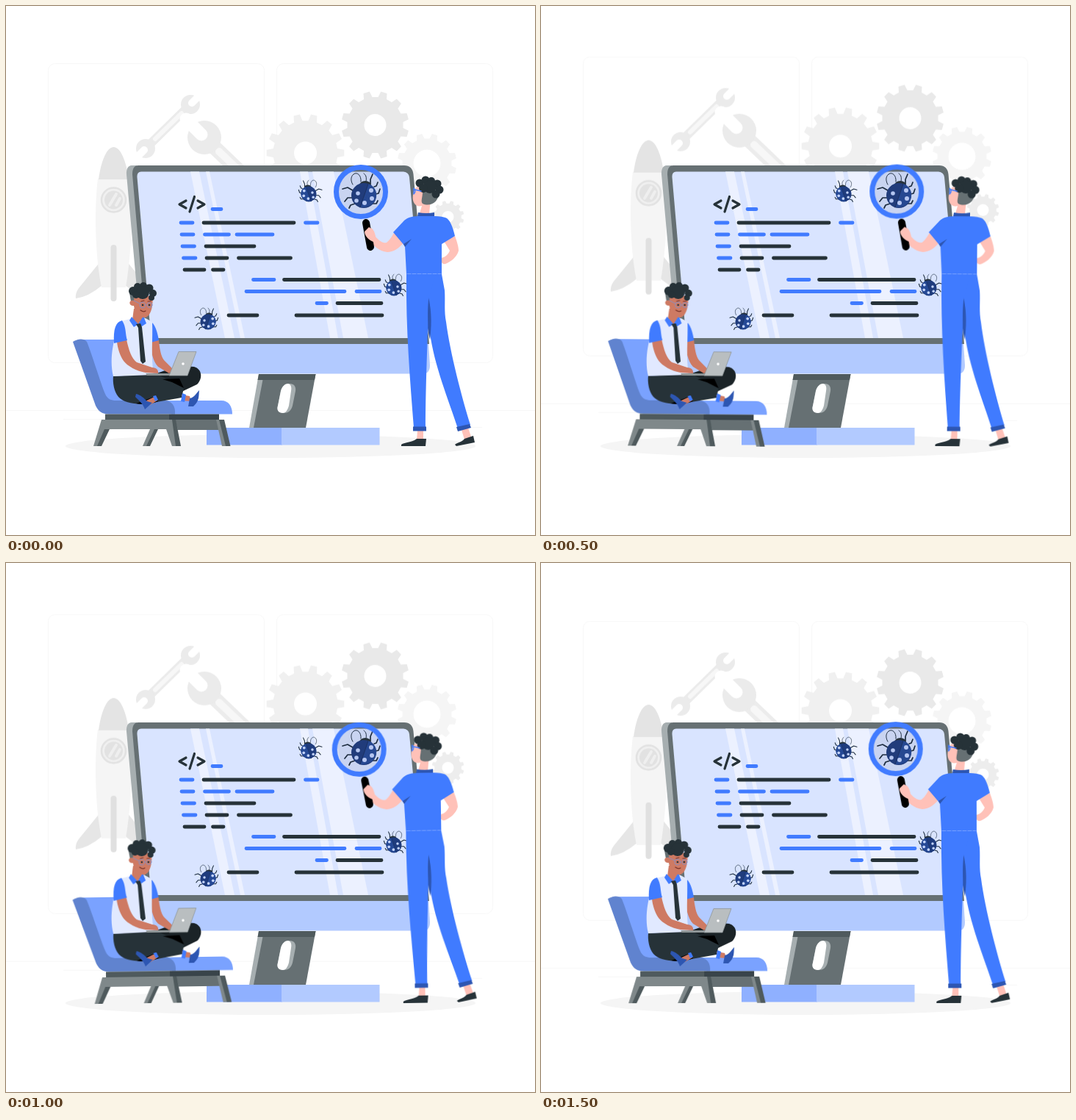
These frames come from a looping animation (720x720 px, 1540 ms). An HTML page:

```html
<!DOCTYPE html>
<html lang="en">
<head>
<meta charset="utf-8">
<title>Debugging</title>
<style>
html, body { margin: 0; width: 100%; height: 100%; overflow: hidden; background: #fff; }
svg { display: block; width: 100%; height: 100%; }
.float { animation: float 1540ms linear -47ms infinite; }
.sway { animation: sway 1540ms linear -47ms infinite; }
#coder { transform-origin: 199.5px 488px; }
#tester { transform-origin: 542px 408px; }
@keyframes float {
  0%, 100% { transform: translateY(.9px); }
  50% { transform: translateY(-13.5px); }
}
@keyframes sway {
  0%, 100% { transform: rotate(-.12deg); }
  25% { transform: rotate(.88deg); }
  75% { transform: rotate(-1.12deg); }
}
.line { fill: none; stroke-linecap: round; stroke-linejoin: round; }
.blue { fill: #407bff; }
.deep { fill: #2d56b2; }
.dark { fill: #263238; }
.steel { fill: #667073; }
.silver { fill: #a6aeb0; }
.pink { fill: #ffc1b8; }
.brown { fill: #ce7a63; }
</style>
</head>
<body>
<svg viewBox="0 0 720 720">
  <defs>
    <g id="bug">
      <g class="line" stroke="#1b2b3c" stroke-width="1.700">
        <path d="M-15-4l-7-4-7 2M-16 6l-6 0-4 5M-12 14l-6 2-2 4M12 14l5 0 2-4M16 1l4-1 2-6M9-13l0-6 3-7M14-9l3-1 2-5"/>
        <path stroke-width="1" d="M-4-16c1-8-5-14-10-10s-3 11-1 14M3-16c1-6 0-9-3-11"/>
      </g>
      <ellipse class="dark" cx="2" cy="-11" rx="8" ry="6"/>
      <ellipse cy="3" rx="17" ry="17" fill="#1f3c7d"/>
      <path d="M6-13C15-10 18-2 17 5 14 15 6 20-5 19Z" fill="#254995"/>
      <path class="line" d="M6-13-5 19" stroke="#182f62"/>
      <g fill="#c3d4ff">
        <circle cx="-8" cy="0" r="2.800"/><circle cx="-10" cy="10" r="2.800"/><circle cx="1" cy="13" r="3"/>
        <circle cx="11" cy="7" r="3"/><circle cx="10" cy="-4" r="3"/>
      </g>
    </g>
  </defs>

  <g class="float">
    <g fill="none" stroke="#f7f7f7">
      <rect x="57.5" y="78.5" width="294" height="407" rx="9"/>
      <rect x="368.5" y="78.5" width="294" height="407" rx="9"/>
      <path d="M0 550.5H720M78 562.5H136M632 573.5H648"/>
    </g>
    <g id="rocket">
      <path fill="#e6e6e6" d="M129 347 99 384Q94 391 95 398 112 396 131 380ZM164 347 194 384Q199 391 198 398 181 396 162 380Z"/>
      <path fill="#f5f5f5" d="M125 235H168C173 280 171 335 163 383H130C121 340 120 275 125 235Z"/>
      <path fill="#e4e4e4" d="M126 236C129 212 137 192 146.500 192S164 212 167 236Z"/>
      <circle cx="146.500" cy="264" r="16.500" fill="#f0f0f0" stroke="#e2e2e2" stroke-width="2.500"/>
      <circle cx="146.500" cy="264" r="12.500" fill="#e2e2e2"/>
      <path class="line" stroke="#efefef" stroke-width="4" d="M141 271 150 256M150 271 155 262"/>
      <rect x="142.500" y="325" width="8" height="77" rx="4" fill="#e0e0e0"/>
    </g>
    <g class="line">
      <path stroke="#ebebeb" stroke-width="12" d="M194 190 247 138"/>
      <path stroke="#f7f7f7" stroke-width="6" d="M203 181 239 146"/>
      <path stroke="#ececec" stroke-width="20" d="M277 186 325 232"/>
      <path stroke="#f7f7f7" stroke-width="10" d="M290 198 330 236"/>
    </g>
    <g fill="#ebebeb">
      <circle cx="251" cy="134" r="13"/><circle cx="190" cy="194" r="13"/><circle cx="270" cy="179" r="23"/>
    </g>
    <g class="line" stroke="#fff">
      <path stroke-width="10" d="M253 132 266 119M188 196 175 209"/>
      <path stroke-width="17" d="M266 175 245 154"/>
    </g>
    <g id="gears"></g>
  </g>

  <ellipse cx="360" cy="599" rx="279" ry="16" fill="#f5f5f5"/>

  <g id="monitor">
    <path fill="#8fb0ff" d="M273 574H376V597.500H273Z"/>
    <path fill="#b2caff" d="M375 574H508.500V597.500H375Z"/>
    <path class="silver" d="M344 501H352L338 574H331Z"/>
    <path class="steel" d="M351 501H421.500L408 574H337Z"/>
    <path fill="#4f5a5d" d="M344 501H421.500L420 509H342.500Z"/>
    <path class="silver" d="M374 524C376 517 381 514 386 514 392 514 395 518 394 524L390 544C388 551 384 554 378 554 371 554 368 550 370 544Z"/>
    <path fill="#fff" d="M374 524C376 517 380 514 384 514 388 515 389 519 388 524L385 544C383 551 380 554 377 554 371 554 368 550 370 544Z"/>
    <path class="silver" d="M178 217H171C166 217 163.500 222 164 229L185 462H200Z"/>
    <path fill="#8fb0ff" d="M185 459H200L204 500H196Q189 500 188 493Z"/>
    <path fill="#b2caff" d="M192 459H575L577 489Q577 500.500 567 500.500H203Q196 500 195 493Z"/>
    <path class="steel" d="M180 217H542Q553 217 554.500 229L576 460H192L172 229Q172 217 180 217Z"/>
    <path fill="#d9e4ff" d="M184 225.500H541Q548 226 549 233L569 452H197.500L178.500 233Q178 226 184 225.500Z"/>
    <path fill="#ecf1ff" d="M251 225.500H263L311 452H298ZM272 225.500H277L325 452H319ZM400 225.500H411L452 452H441ZM417 225.500H446L493 452H459Z"/>
    <g class="line" stroke-width="3.200" stroke="#263238">
      <path d="M245 265 236 270 245 275M256.500 259.500 250 280M261 265 270 270 261 275"/>
    </g>
    <g class="line" stroke-width="4.800">
      <path stroke="#407bff" d="M281 276.500h12M238 295h16M407.500 295H424M239 311h16M270.500 311h33M314 311h49M240 327h16.500M241.500 343H258M336.500 372.500H365M327 388.500H461M477 388.500h32M423 404.500h13.500"/>
      <path stroke="#263238" d="M269 295H392M272 327h66M273 343h28M316.500 343h71M243 359h27M281.500 359H296M378.500 372.500H508M451 404.500h60M303 421h39M395 421H512"/>
    </g>
    <use href="#bug" transform="translate(412 254) scale(-.62 .62)"/>
    <use href="#bug" transform="translate(275 428) scale(.62)"/>
    <use href="#bug" transform="translate(528 382) scale(-.62 .62)"/>
    <use href="#bug" transform="translate(487 255)"/>
  </g>

  <g id="coder" class="sway">
    <path fill="#7aa2ff" d="M97 454H152L180 540H130L108 470ZM213 537H293C303 537 308 545 308 555.500H225Z"/>
    <path fill="#6083cf" d="M91 457C98 453 105 452 110 457 115 468 129 514 135 528 138 535 143 537 150 537H215C226 537 231 545 230 555.500H140C131 555.500 126 552 122 544Z"/>
    <path fill="#4f5a5d" d="M135 555.500H222V563H135Z"/>
    <path fill="#39444a" d="M222 555.500H290V563H222Z"/>
    <path class="steel" d="M229 563H292V577H232Z"/>
    <path fill="#7f888a" d="M130 563H230L234 576H136L125 599H119ZM196 576H204L192 599H186ZM218 576H230L232 599H226ZM286 563H291L300 599H294Z"/>
    <path fill="#4f5a5d" d="M134 576H141L130 599H124ZM202 576H207L196 599H191ZM226 563H231L238 599H231ZM290 563H297L305.500 599H299Z"/>

    <path fill="#1b2327" d="M200 502C225 492 244 489 256 491 267 494 268 507 260 515L239 525 215 520Z"/>
    <path class="dark" d="M146 504 205 500C218 509 236 514 242 520L239 533 205 539C185 544 162 542 153 532 147 525 145 512 146 504Z"/>
    <path d="M213 508 236 507 242 520 226 512ZM177 541 201 532 207 538C198 542 187 543 177 541Z"/>
    <path class="brown" d="M189 538 204 531 206 537 196 543ZM239 529 250 531 252 538 240 537Z"/>
    <path class="blue" d="M240 527 245 529 243 539 238 538ZM200 531 204 530 207 536 203 538Z"/>
    <path class="deep" d="M177 528C183 529 188 534 192 538L199 540 189 549C187 542 181 537 176 532ZM263 523C262 530 264 537 255 545L248 545 250 534C256 533 259 527 263 523Z"/>

    <path class="brown" d="M197 456 208 455C209 466 211 477 215 482L229 496 222 500 207 491C200 484 197 470 197 456Z"/>
    <path class="blue" d="M196 429C203 432 206 444 208 455L197 458Z"/>
    <path fill="#e1e9ff" d="M156 429 173 425 190 425 199 430C200 455 197 475 201 502L146 504C140 478 147 450 156 429Z"/>
    <path class="brown" d="M151 457 164 454C167 468 171 480 178 485L199 492C205 492 208 496 207 500L190 499C178 497 165 490 160 483 155 476 152 466 151 457Z"/>
    <path class="blue" d="M158 428C149 430 146 440 147 459L165 455C162 446 164 437 158 428Z"/>
    <path class="brown" d="M174 412H188L187 429 180 435 172 427Z"/>
    <path class="blue" d="M171 423 180 433 174 437 168 428ZM187 422 191 432 185 436 180 433Z"/>
    <path class="dark" d="M177 433 183 432 185 437 190 484 186 487 183 483 180 438Z"/>

    <path class="steel" d="M168 390H178L176 405 170 402Z"/>
    <path class="brown" d="M175 393C183 396 192 396 199 393 201 406 198 421 190 424 181 424 175 417 174 408 167 409 166 399 174 401Z"/>
    <g class="dark">
      <circle cx="173" cy="388" r="6"/><circle cx="179" cy="382" r="5"/><circle cx="187" cy="381" r="5"/>
      <circle cx="195" cy="384" r="5.500"/><circle cx="200" cy="391" r="5"/><circle cx="186" cy="390" r="9"/>
      <circle cx="177" cy="393" r="5"/><circle cx="198" cy="397" r="4"/>
      <circle cx="186" cy="407" r="1.300"/><circle cx="195" cy="407" r="1.300"/>
    </g>
    <g class="line" stroke="#8a8fc0" stroke-width="1">
      <path d="M174 401 182 405"/><circle cx="186" cy="407" r="4"/><circle cx="195.500" cy="407" r="3.500"/>
    </g>
    <path class="line" stroke="#7a3328" stroke-width="1.200" d="M183 414Q187 417 190 415M184 402 188 401M193 402 197 402"/>

    <path fill="#8f9698" d="M190 500H224L246 500V503H192Z"/>
    <path fill="#b9bec0" stroke="#8f9698" stroke-width=".8" d="M235 470.500H259L247 503H222Z"/>
    <circle cx="241" cy="487" r="1.800" fill="#fff"/>
  </g>

  <g id="tester" class="sway">
    <circle cx="483" cy="253" r="33.500" fill="#2d3f66" fill-opacity=".09" stroke="#407bff" stroke-width="7"/>
    <path class="pink" d="M490 307 496 302C500 303 502 308 503 314 509 321 514 323 518 322 523 318 526 312 529 307L542 321C535 330 527 335 519 335 508 334 498 325 494 318Z"/>
    <path class="line" stroke="#000" stroke-width="10" d="M490 295 496 328"/>
    <path class="pink" d="M488 307 494 301C499 303 501 308 503 314L500 321C494 319 488 313 488 307Z"/>
    <path class="pink" d="M611 313C614 321 616 328 616 333 614 342 604 349 598 351 594 352 591 348 592 343 598 342 602 338 604 333L596 320Z"/>
    <path class="pink" d="M560 578H568V591H559ZM620 577 629 574 633 586 624 590Z"/>
    <path class="dark" d="M559 589H572L571 599H538V597C541 594 553 594 559 589ZM624 589 636 585 638 594 613 599 611 597C614 594 620 594 624 589Z"/>
    <path class="blue" d="M560 365H593L597 387C598 402 596 416 599 430 604 470 621 535 632 570L615 575C602 535 583 490 577 445L570 395Z"/>
    <path class="deep" d="M575 396C571 415 573 440 577 454 579 438 580 418 575 396Z"/>
    <path class="blue" d="M545 364H585L575 400C573 420 575 432 574 445 572 500 571 540 571 574H555C550 510 544 440 545 364Z"/>
    <path class="deep" d="M554 572.500H572V578.500H554ZM613 573 631 569 633 574 615 579Z"/>
    <path class="blue" d="M562 286C550 286 545 289 541 293L527 308 543 327 545 365H593V324L611 313C608 300 604 290 598 288 591 286 585 286 581 286Z"/>
    <path class="deep" d="M552 317 541 324 543 328Z"/>
    <path class="line" stroke="#77a0ff" d="M546 364.500H592" stroke-dasharray="5 2"/>
    <path class="pink" d="M559 246C553 253 552 264 556 269 558 272 562 273 566 272L563 282 576 283 578 262 568 248Z"/>
    <path class="deep" d="M561 281Q572 283 583 281V286H560Z"/>
    <path class="steel" d="M567 253C567 261 564 266 567 269 578 274 590 266 589 253Z"/>
    <g class="dark">
      <circle cx="563" cy="241" r="5.500"/><circle cx="571" cy="237" r="5.500"/><circle cx="579" cy="238" r="5"/>
      <circle cx="587" cy="242" r="5.500"/><circle cx="590" cy="250" r="5.500"/><circle cx="577" cy="246" r="9"/>
      <circle cx="585" cy="256" r="5.500"/><circle cx="568" cy="248" r="6"/>
    </g>
    <path class="line" stroke="#407bff" stroke-width="1.300" d="M565 252 557 250M555 248Q559 252 555 256Z"/>
  </g>
</svg>
<script>
const gears = document.getElementById('gears');

function gear(x, y, r, hole, teeth, fill) {
  const step = 2 * Math.PI / teeth, root = r * .83;
  const at = (a, d) => `${(x + d * Math.sin(a)).toFixed(1)} ${(y - d * Math.cos(a)).toFixed(1)}`;
  const points = [];
  for (let i = 0; i < teeth; i++) {
    const a = (i + .5) * step;
    points.push(at(a - .3 * step, root), at(a - .18 * step, r), at(a + .18 * step, r), at(a + .3 * step, root));
  }
  const ring = `M${x - hole} ${y}a${hole} ${hole} 0 1 0 ${2 * hole} 0a${hole} ${hole} 0 1 0 ${-2 * hole} 0Z`;
  return `<path fill="${fill}" fill-rule="evenodd" d="M${points.join('L')}Z${ring}"/>`;
}

gears.innerHTML =
  gear(407.5, 200, 53, 15.5, 14, '#f0f0f0') +
  gear(502.5, 162, 46, 15, 12, '#e9e9e9') +
  gear(573, 214, 40.5, 18.5, 12, '#f5f5f5') +
  gear(601.5, 287, 22, 8, 12, '#ededed');
</script>
</body>
</html>
```
